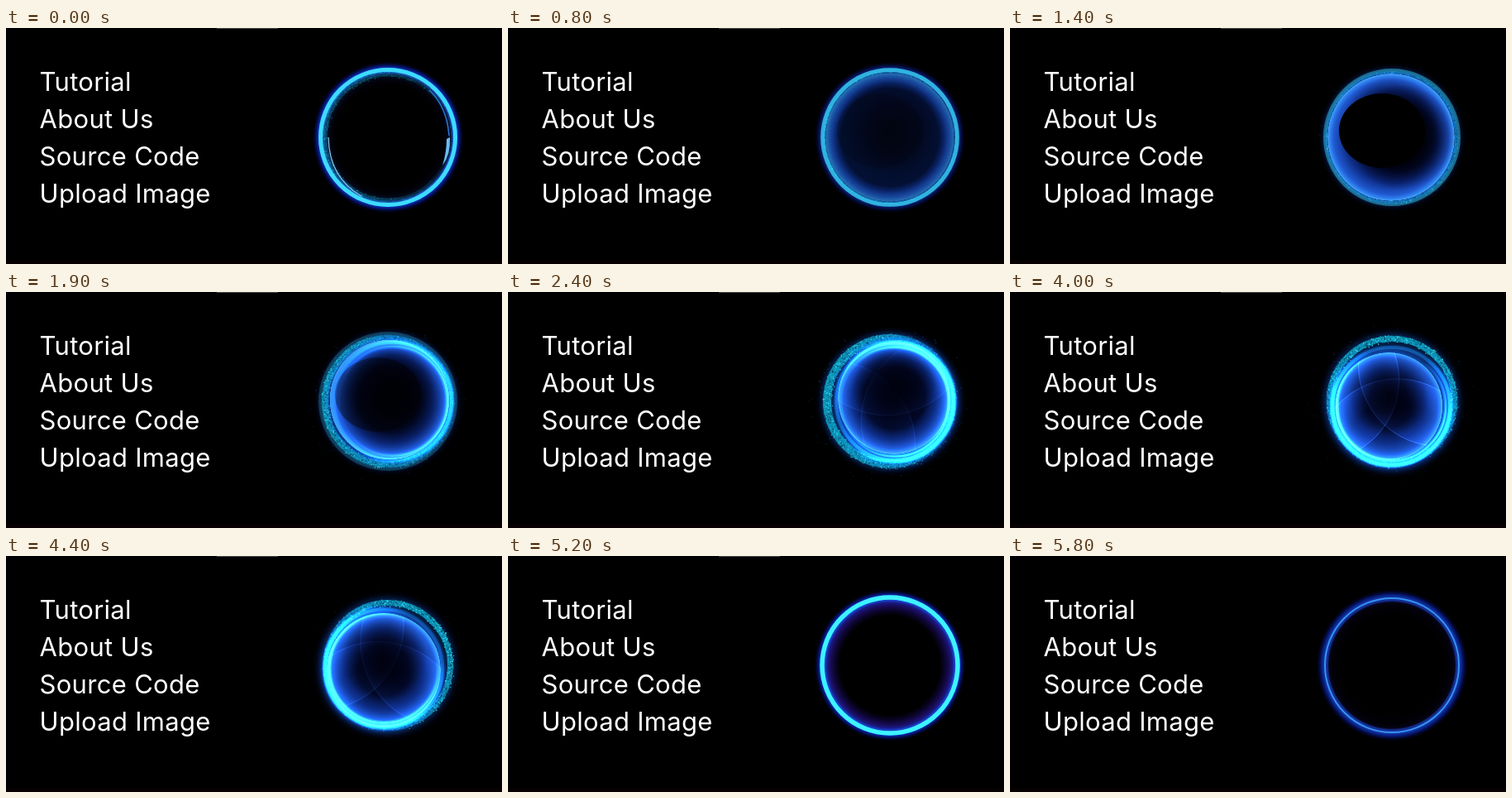
These frames come from a looping animation (600 px wide and 285 px high, 5900 ms). An HTML page with a canvas:

```html
<!DOCTYPE html>
<html lang="en">
<head>
<meta charset="utf-8">
<title>Energy ring menu</title>
<style>
html, body { margin: 0; width: 100%; height: 100%; overflow: hidden; background: #000; }
canvas { position: absolute; left: 0; top: 0; }
nav {
  position: absolute; left: 40.5px; top: 42px; color: #fff; white-space: pre;
  font: 400 31px/45px Poppins, Inter, sans-serif; letter-spacing: .01em;
}
</style>
</head>
<body>
<canvas width="600" height="285"></canvas>
<nav>Tutorial
About Us
Source Code
Upload Image</nav>
<script>
const c = document.querySelector('canvas').getContext('2d');
const LOOP = 5900, STEP = 100, CX = 462, CY = 132, TAU = Math.PI * 2;

const fields = 'at r w core hue glow x y size ball open band bw peak'.split(' ');
const keys = [
  [0,    81.5, 5, 1, 191, .9, 462, 132, 79, 0, .85, .4, 6, 180],
  [700,  81.5, 5, .8, 190, .6, 462, 132, 78, .5, .8, .7, 6, 180],
  [1400, 81, 4, .4, 188, .1, 461, 132, 77, 1, .5, 1, 6, 170],
  [2400, 83, 4, 0, 190, .1, 467, 128, 68, 1, .55, 1, 10, 185],
  [3300, 82, 4, 0, 190, .1, 461, 138, 58, 1, .3, 1, 8, 195],
  [4400, 81, 4, 0, 186, .1, 457, 138, 69, 1, .45, 1, 7, 325],
  [5200, 82, 5.5, 1, 184, 1, 462, 132, 79, 0, .85, 0, 5, 360],
  [5800, 81, 2, .85, 208, .75, 462, 132, 79, 0, .85, 0, 5, 360]
];

let seed = 7;
const rnd = () => (seed = seed * 16807 % 2147483647) / 2147483647;
const specks = Array.from({ length: 1300 }, () => ({
  a: rnd() * TAU, d: rnd() - .5, s: .5 + rnd(), dark: rnd() < .6, v: .6 + rnd() * .8
}));
const dust = Array.from({ length: 170 }, () => ({
  a: rnd() * TAU, d: rnd() ** 2 * 27, s: .5 + rnd() * .9, v: rnd()
}));

const bump = (t, mid, half) => Math.max(0, 1 - Math.abs(t - mid) / half);

function pose(t) {
  const i = Math.max(1, keys.findIndex(k => k[0] >= t));
  const a = keys[i - 1], b = keys[i], u = (t - a[0]) / (b[0] - a[0]);
  const p = Object.fromEntries(fields.map((f, j) => [f, a[j] + (b[j] - a[j]) * u]));
  p.turn = p.peak * Math.PI / 180;
  return p;
}

function addStops(g, stops) {
  stops.forEach(([at, color]) => g.addColorStop(at, color));
  return g;
}

const radial = (x, y, r0, r1, stops) => addStops(c.createRadialGradient(x, y, r0, x, y, r1), stops);

// Sweep that is strongest at the angle and falls to `low` opposite it
const sweep = (angle, x, y, rgb, high, low) =>
  addStops(c.createConicGradient(angle, x, y),
    [[0, high], [.22, high * .85], [.42, low], [.58, low], [.78, high * .85], [1, high]]
      .map(([at, a]) => [at, `rgba(${rgb},${a})`]));

function disc(x, y, r, fill) {
  c.fillStyle = fill;
  c.beginPath();
  c.arc(x, y, r, 0, TAU);
  c.fill();
}

function stroke(style, width, path) {
  c.strokeStyle = style;
  c.lineWidth = width;
  c.beginPath();
  path();
  c.stroke();
}

function drawGlow(p, t) {
  const inner = bump(t, 5200, 500) * .65 + .1;
  c.globalAlpha = p.glow;
  disc(CX, CY, 92, radial(CX, CY, 60, 92, [
    [0, 'rgba(20,8,90,0)'], [.38, `rgba(34,16,120,${inner})`], [.5, `rgba(28,34,160,${inner + .1})`],
    [.56, '#1a3ec4'], [.72, '#1640d0'], [.8, '#08209a'], [.9, 'rgba(3,12,80,.6)'], [1, 'rgba(0,0,40,0)']
  ]));
  c.globalAlpha = 1;
}

function drawBand(p, t) {
  const mid = p.r - 2 - p.bw / 2, even = bump(t, 1400, 900);
  c.globalAlpha = p.band;
  c.shadowColor = '#0a50a8';
  c.shadowBlur = 7;
  stroke(sweep(p.turn, CX, CY, '14,168,200', .85, .2 + .5 * even), p.bw,
    () => c.arc(CX, CY, mid, 0, TAU));
  c.shadowBlur = 0;
  for (const s of specks) {
    const a = s.a + t / 1500 * s.v, r = mid + s.d * (p.bw + 2);
    c.globalAlpha = p.band * (s.dark ? .6 : .3 + .5 * Math.cos((a - p.turn) / 2) ** 2);
    c.fillStyle = s.dark ? '#02222e' : '#3ceaf0';
    c.fillRect(CX + r * Math.cos(a), CY + r * Math.sin(a), s.s, s.s);
  }
  c.globalAlpha = 1;
}

// Wide shallow curves crossing the ball
function drawSwirls(p, t) {
  const n = Math.min(1, 1.5 * bump(t, 3500, 1400));
  c.globalCompositeOperation = 'lighter';
  for (let i = 0; i < 3; i++) {
    const a = i * 2.1 + 1 + t / 1600, r = p.size * 1.5, d = r - p.size * (.1 + .2 * i);
    const x = p.x + d * Math.cos(a), y = p.y + d * Math.sin(a);
    disc(x, y, r, radial(x, y, r * .7, r, [
      [0, 'rgba(30,80,220,0)'], [1, `rgba(40,90,220,${.2 * n})`]
    ]));
    stroke(`rgba(70,140,250,${.35 * n})`, 1, () => c.arc(x, y, r, 0, TAU));
  }
  c.globalCompositeOperation = 'source-over';
}

function drawBall(p, t) {
  if (!p.ball) return;
  const { x, y, size, open } = p, hole = bump(t, 1400, 900), top = y - size * .2;
  c.save();
  c.globalAlpha = p.ball;
  c.shadowColor = '#1464ff';
  c.shadowBlur = 8;
  disc(x, y, size, '#000');
  c.shadowBlur = 0;
  c.beginPath();
  c.arc(x, y, size, 0, TAU);
  c.clip();
  disc(x, y, size, radial(x, y, 0, size, [
    [0, '#01020c'], [open, '#020a2c'], [open + (.9 - open) * .55, '#0d2c84'],
    [.9, '#2058d0'], [.96, '#2e80ee'], [1, '#48a8ff']
  ]));
  drawSwirls(p, t);
  disc(x, top, size * .75, radial(x, top, 0, size * .75, [
    [0, 'rgba(0,0,12,.9)'], [.45, 'rgba(0,0,16,.65)'], [1, 'rgba(0,0,20,0)']
  ]));
  if (hole) {
    c.globalAlpha = hole * p.ball;
    disc(474, 132, 64, radial(474, 132, 20, 64, [
      [0, '#000'], [.45, 'rgba(0,2,20,.8)'], [1, 'rgba(4,10,60,0)']
    ]));
    c.fillStyle = '#000';
    c.beginPath();
    c.ellipse(450, 124, 52, 45, 0, 0, TAU);
    c.fill();
  }
  c.restore();
}

// Bright inner loop leaning away from the speckled band's peak
function drawStrand(p, t) {
  const n = Math.min(1, 2 * bump(t, 3300, 1800)), away = p.turn + Math.PI;
  const x = CX + 6 * Math.cos(away), y = CY + 6 * Math.sin(away);
  const loop = r => () => c.arc(x, y, r, 0, TAU);
  c.globalCompositeOperation = 'lighter';
  c.globalAlpha = n;
  c.shadowColor = '#1060f0';
  c.shadowBlur = 12;
  stroke(sweep(away, x, y, '24,100,230', .8, .15), 11, loop(69));
  c.shadowBlur = 4;
  stroke(sweep(away, x, y, '30,170,230', .75, .25), 4, loop(71));
  stroke(sweep(away, x, y, '50,190,220', .7, 0), 2, loop(66));

  const spark = bump(t, 3300, 500);
  c.globalAlpha = spark;
  disc(488, 175, 6, 'rgba(40,180,250,.85)');
  c.globalAlpha = spark * .4;
  disc(392, 70, 5, '#1040a0');
  c.globalAlpha = 1;
  c.shadowBlur = 0;
  c.globalCompositeOperation = 'source-over';
}

function drawDust(t) {
  const n = bump(t, 2900, 2000);
  c.fillStyle = '#1c78d8';
  for (const s of dust) {
    const a = s.a + t / 4000, r = 80 + s.d * (.7 + t / 9000);
    c.globalAlpha = n * s.v * (1 - s.d / 34);
    c.fillRect(CX + r * Math.cos(a), CY + r * Math.sin(a), s.s, s.s);
  }
  c.globalAlpha = 1;
}

function drawStreaks(t) {
  c.globalAlpha = bump(t, 0, 700);
  stroke('#8cc8f4', 1.2, () => {
    c.moveTo(390, 132);
    c.quadraticCurveTo(391, 181, 430, 203);
  });
  stroke('#2c78d0', 1.5, () => {
    c.moveTo(512, 75);
    c.quadraticCurveTo(533, 94, 536, 130);
  });
  c.fillStyle = '#6cbcf0';
  c.beginPath();
  c.moveTo(537, 132);
  c.quadraticCurveTo(538, 153, 528, 166);
  c.quadraticCurveTo(533, 150, 533, 134);
  c.fill();
  c.globalAlpha = 1;
}

function draw(t) {
  const p = pose(t);
  c.fillStyle = '#000';
  c.fillRect(0, 0, 600, 285);
  c.fillStyle = '#080102';
  c.fillRect(0, 281, 600, 4);
  if (t < 5300) {
    c.fillStyle = '#484848';
    c.fillRect(255, 0, 74, 1);
  }
  drawGlow(p, t);
  drawDust(t);
  drawBand(p, t);
  drawBall(p, t);
  drawStrand(p, t);
  stroke(`hsla(${p.hue},100%,62%,${p.core})`, p.w, () => c.arc(CX, CY, p.r, 0, TAU));
  drawStreaks(t);
}

const start = performance.now();
function tick() {
  const t = (performance.now() - start) % LOOP;
  draw(Math.floor(t / STEP) * STEP);
  requestAnimationFrame(tick);
}
tick();
</script>
</body>
</html>
```
